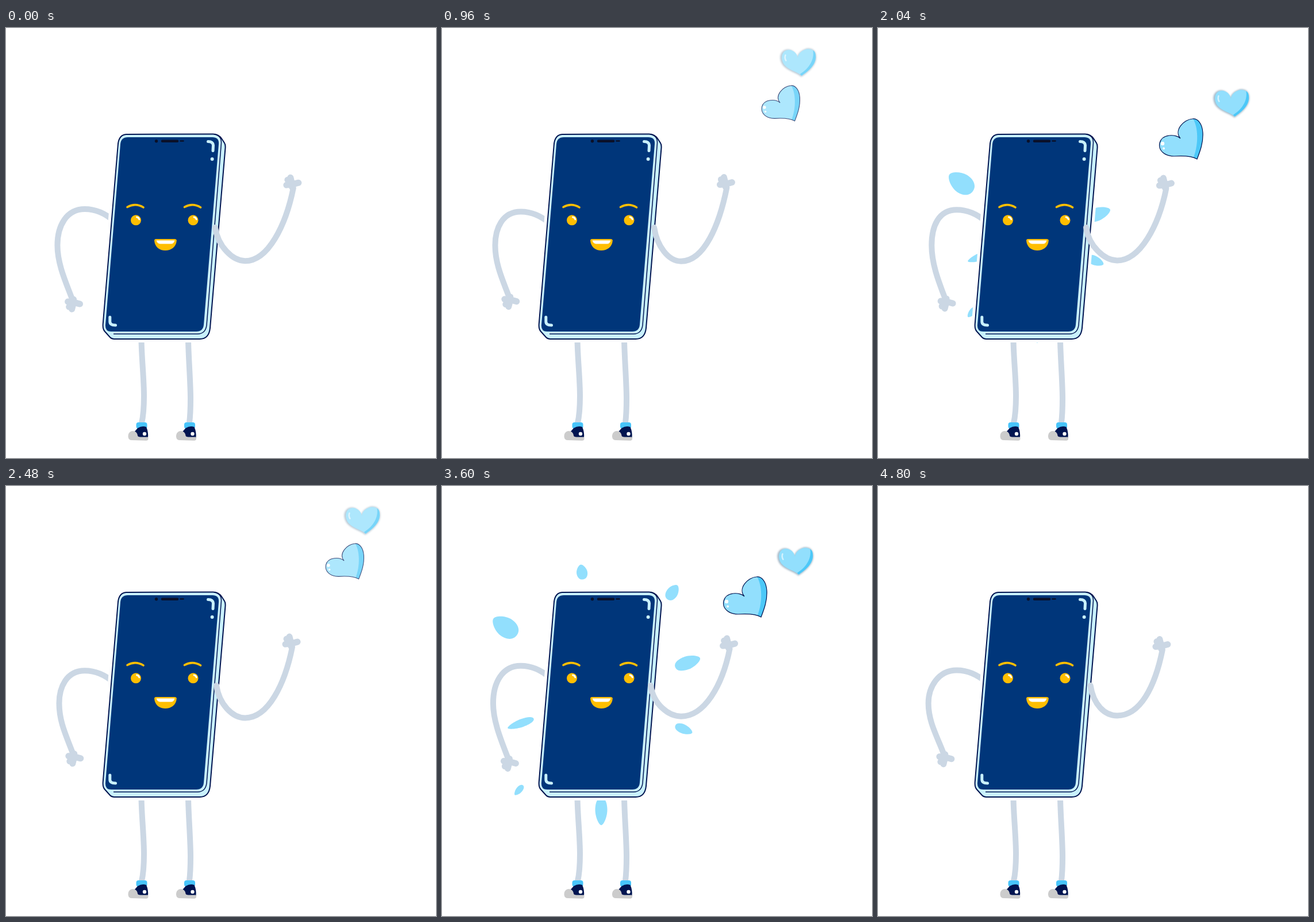
Write an HTML page that moves like this. It is 748 px wide and 748 px high and loops after 4840 ms.

```html
<!DOCTYPE html>
<html lang="en">
<head>
<meta charset="utf-8">
<title>Waving phone</title>
<style>
html, body { margin: 0; width: 100%; height: 100%; overflow: hidden; background: #fff; }
svg { display: block; width: 100vw; height: 100vh; }
.limb { fill: none; stroke: #cbd7e4; stroke-width: 10; stroke-linecap: round; stroke-linejoin: round; }
.line { fill: none; stroke: #001450; stroke-width: 1.5; }
.shine { fill: none; stroke: #c9f1fd; stroke-width: 5; stroke-linecap: round; stroke-linejoin: round; }
.brow { fill: none; stroke: #ffbe00; stroke-width: 3.6; stroke-linecap: round; }
.glint { fill: none; stroke: #fff; stroke-width: 2.8; stroke-linecap: round; }
.notch { stroke: #0a1028; stroke-linecap: round; }
</style>
</head>
<body>
<svg viewBox="0 0 748 748">
  <defs>
    <path id="body" d="M209 185 L360 184.500 Q370 184.500 375.500 193 L380 200 Q382 203 381.500 209 L355 522 Q353 541 337 541 H188 Q184 541 181 538 L172 528 Q168 524 168.700 515 L195 201 Q197 186 209 185Z"/>
    <g id="shoe">
      <rect x="226.500" y="686" width="19" height="11" rx="4" fill="#48c4fa"/>
      <path d="M229 696 Q237 691 244 694 Q248 703 247 713 H222 V704Z" fill="#001450"/>
      <path d="M212.500 711 C212 698 228 698 229 709 Q229 711 234 711.500 L247 711.500 Q249 717.500 244 717.800 L219 717 Q213 717 212.500 711Z" fill="#ccc"/>
      <circle cx="241" cy="706" r="3.200" fill="#fff"/>
    </g>
    <g id="eye">
      <path class="brow" d="M211 311.500 Q225 303.500 239 312"/>
      <circle cx="226" cy="334.300" r="9" fill="#ffbe00"/>
      <path class="glint" d="M227.500 329 Q231 329.500 231.800 333"/>
    </g>
    <path id="hand" class="limb" style="stroke-width:11" d="M0 0L-3 -12M0 0L-8 -8M0 0L-10 1M0 0L11 -3M0 0V5"/>
    <path id="leaf" d="M-1 0C-1 -.75 -.5 -1 -.1 -1C.4 -1 1 -.4 1 0C1 .4 .4 1 -.1 1C-.5 1 -1 .75 -1 0Z"/>
    <filter id="soft" x="-20%" y="-20%" width="140%" height="140%"><feGaussianBlur stdDeviation="1.800"/></filter>
    <path id="little" d="M613 123 C611 112 600 106 592 109 C581 113 581 128 589 137 C597 146 612 149 620 156 C632 148 647 136 646 120 C645 106 633 105 626 108 C618 111 613 117 613 123Z"/>
    <path id="large" d="M526 192 C518 184 494 184 490 200 C487 214 500 223 515 223 C530 222 545 222 555 228 C560 215 566 200 565 182 C564 166 556 157 547 158 C532 159 514 178 526 192Z"/>
  </defs>
  <rect width="748" height="748" fill="#fff"/>
  <g id="bits" fill="#92dffd"></g>
  <path id="armL" class="limb"/>
  <use id="handL" href="#hand"/>
  <path class="limb" d="M235.500 543 C236 575 240 610 240 640 Q240 670 236 687"/>
  <path class="limb" d="M317 543 C317.500 575 321 615 321 645 Q321 670 319 687"/>
  <use href="#shoe"/>
  <use href="#shoe" x="83.500"/>

  <use href="#body" fill="#fff" stroke="#fff" stroke-width="12"/>
  <use href="#body" fill="#c9f1fd" stroke="#001450" stroke-width="2"/>
  <path class="line" d="M362 185 Q375 187 374.500 200 L349 517 Q347 532 333 532.300 H187"/>
  <path d="M212 190 H359 Q371 190 370 202 L344 516 Q343 528 331 528 H183 Q172 528 173 516 L199 202 Q200 190 212 190Z" fill="#00367a"/>
  <circle cx="261.500" cy="196.700" r="2.700" fill="#0a1028"/>
  <path class="notch" stroke-width="4.500" d="M272 196.700 H298"/>
  <path class="notch" stroke-width="2.400" d="M303.500 196.500 H308.500"/>
  <path class="shine" d="M351.500 197.500 Q360 197.500 360.500 204 L360 213.500"/>
  <circle cx="358.600" cy="228" r="3" fill="#c9f1fd"/>
  <path class="shine" d="M180.800 503 V511 Q181 517 190.500 517"/>
  <use href="#eye"/>
  <use href="#eye" x="99.500"/>
  <path d="M258 370 Q258 367 261 367 H293 Q297 367 296.800 370 C296 381 287 387 277 387 S259 381 258 370Z" fill="#ffbe00"/>
  <path d="M261.500 369.500 H293.500 Q292 375.500 287 375.500 H268 Q263 375 261.500 369.500Z" fill="#fff"/>

  <path id="armR" class="limb"/>
  <use id="handR" href="#hand"/>
  <g id="small">
    <use href="#little" fill="#7f9db3" opacity=".7" filter="url(#soft)"/>
    <g transform="translate(630 122) scale(.94) translate(-630 -122)">
      <use href="#little" fill="#92dffd"/>
      <path d="M641 109 C644 125 635 142 617 153 L620 156 C632 148 647 136 646 120 C646 114 644 111 641 109Z" fill="#4cc8f8"/>
      <path class="glint" opacity=".6" d="M590 118 Q588 123 591 128"/>
    </g>
  </g>
  <g id="big">
    <use href="#large" fill="#92dffd"/>
    <path d="M548 158 C557 172 558 202 549 225 L555 228 C560 215 566 200 565 182 C564 166 556 157 548 158Z" fill="#4cc8f8"/>
    <use href="#large" class="line" style="stroke-width:1.200"/>
    <circle cx="495" cy="201" r="3.200" fill="#fff"/>
    <circle cx="497" cy="209.500" r="2" fill="#fff"/>
  </g>
</svg>
<script>
const $ = id => document.getElementById(id);
const STEP = 40, COUNT = 121, CYCLE = 38, BURSTS = 6;
const lerp = (a, b, k) => a + (b - a) * k;
const clamp = k => Math.max(0, Math.min(1, k));
const wave = (t, period, peak, size) => size * Math.cos((t - peak) / period * 2 * Math.PI);

// Leaves fly out from the phone: angle, radius, half length, half width, life
const leaves = [
  [-20, 160, 23, 11.5, 3.1], [23, 156, 16, 8, 3.1], [160, 149, 24, 7, 3.1],
  [215, 204, 25, 17, 2.6], [305, 216, 15, 10, 2.4], [90, 204, 24, 10.5, 2.6],
  [130.6, 220, 11, 5.5, 1.9], [261, 215, 13, 9.5, .6]
].map(([angle, radius, len, wide, life]) => {
  const node = document.createElementNS('http://www.w3.org/2000/svg', 'use');
  node.setAttribute('href', '#leaf');
  $('bits').append(node);
  return { node, angle, radius, len, wide, life, inner: radius < 200 };
});

function drawLeaves(frame) {
  const u = frame * BURSTS % CYCLE / BURSTS, x = u - 4 / 3;
  for (const l of leaves) {
    const age = clamp(x / l.life);
    const shrink = l.inner ? Math.sqrt(1 - age * age) : 1 - age;
    const s = Math.min(1, u * 3) * shrink;
    const out = l.radius * (l.inner ? 1 + .3 * x : 1 + .19 * x - .018 * x * x);
    l.node.setAttribute('transform',
      `translate(277 362) rotate(${l.angle}) translate(${out} 0) scale(${l.len * s} ${l.wide * s})`);
  }
}

function drawArms(frame) {
  const drop = wave(frame, 49, 16, 4.5);
  const bend = wave(frame, 140, 43, 3);
  const top = 317.2 + drop, lx = 90.5 + bend;
  const hx = 118 + bend * .4, hy = 475 - drop;
  $('armL').setAttribute('d', `M188 ${top + 21}C170 ${top + 5} 152 ${top} 137 ${top}` +
    `C105 ${top} ${lx} ${top + 29} ${lx} 378C${lx} 410 ${hx - 14} ${hy - 36} ${hx - 3} ${hy - 7}`);
  $('handL').setAttribute('transform', `translate(${hx} ${hy}) scale(1 -1)`);

  const swing = wave(frame, 44, 73, 4);
  const sag = wave(frame, 200, 20, 3.2);
  const sx = 366 + swing, low = 402.6 + sag;
  const rx = 496 - swing * .85, ry = 275 - sag * 1.1;
  $('armR').setAttribute('d', `M${sx} 347C${sx + 5} 380 394 ${low} 416 ${low}` +
    `C456 ${low} ${rx - 11} ${ry + 71} ${rx + 2} ${ry + 6}`);
  $('handR').setAttribute('transform', `translate(${rx} ${ry})`);
}

// A heart eases in from one offset, pauses, then rises to another and fades
function drawHeart(id, cx, cy, from, to, h) {
  const enter = clamp((7 - h) / 3);
  const rise = 1 - (1 - clamp((h - 7) / 4)) ** 3;
  const x = from.x * enter + to.x * rise, y = from.y * enter + to.y * rise;
  const s = lerp(1, from.s, enter) * lerp(1, to.s, rise);
  $(id).setAttribute('transform', `translate(${cx + x} ${cy + y}) scale(${s}) translate(${-cx} ${-cy})`);
  $(id).setAttribute('opacity', h < 4 ? 0 : 1 - clamp((h - 11) / 4));
}

function draw(ms) {
  const frame = Math.floor(ms / STEP) % COUNT;
  const h = Math.floor((frame % CYCLE + 1) / 2);
  drawLeaves(frame);
  drawArms(frame);
  drawHeart('small', 615, 130, { x: -27, y: -14, s: 1 }, { x: 5, y: -71, s: 1 }, h);
  drawHeart('big', 527, 193, { x: -22, y: 62, s: .1 }, { x: 62, y: -62, s: .88 }, h);
}

const start = performance.now();
function tick() {
  draw(performance.now() - start);
  requestAnimationFrame(tick);
}
tick();
</script>
</body>
</html>
```
